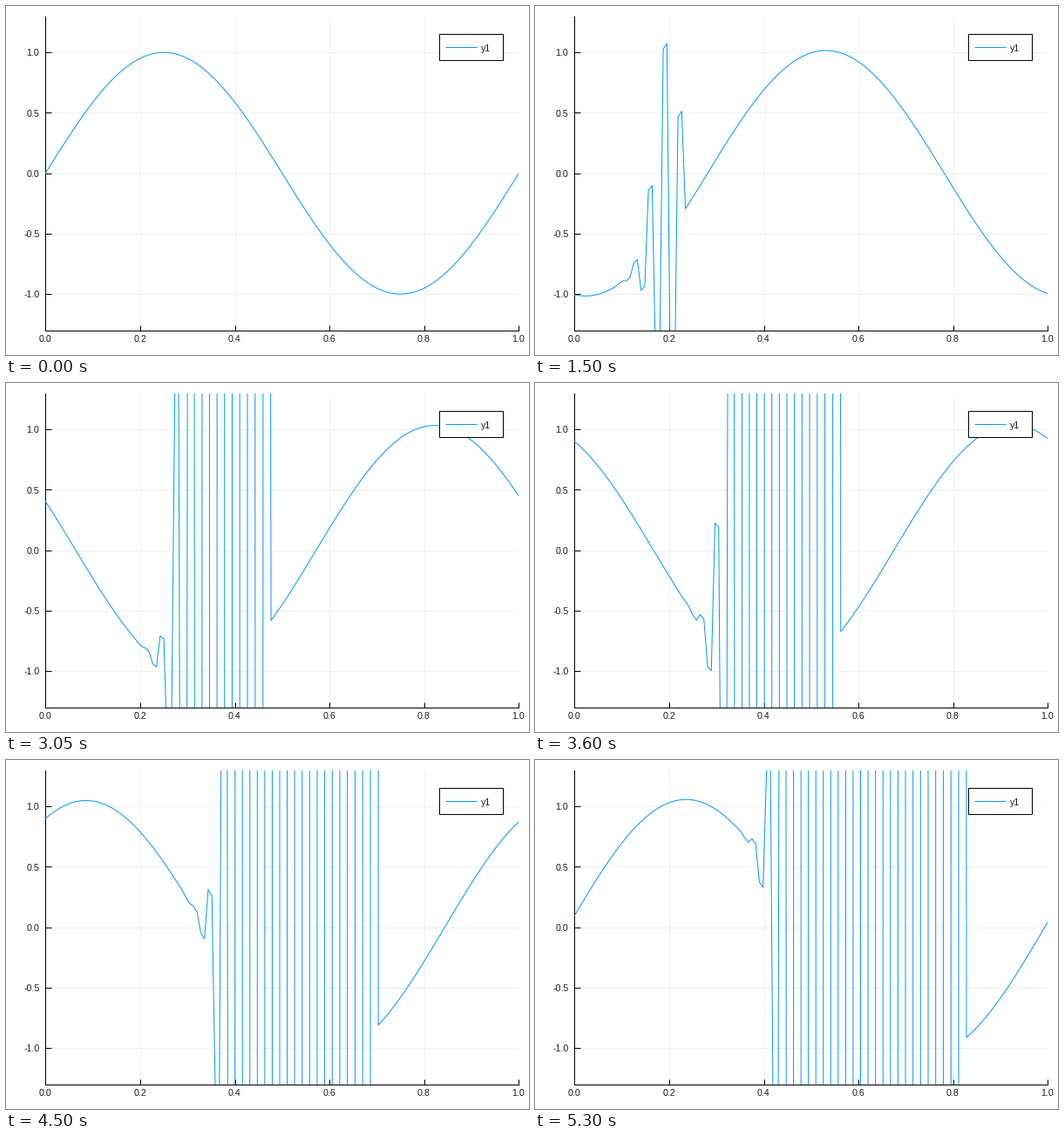
A matplotlib script that plays this animation: 600 by 400 pixels, repeating every 5350 ms.

```python
import numpy as np
import matplotlib.pyplot as plt
from matplotlib.animation import FuncAnimation
from matplotlib.patches import Rectangle

W, H, DPI = 600, 400, 100
PX = 72 / DPI  # points per pixel
LEFT, TOP, PLOT_W, PLOT_H = 45.3, 11.7, 543, 360
CELLS, FRAMES, COURANT = 128, 107, 1.2
BLUE, INK = "#009afa", "#1c1c1c"

plt.rcParams.update({
    "font.family": "Liberation Sans",
    "font.size": 10.6 * PX,
    "path.simplify": False,
})


def lax_friedrichs(u):
    """One advection step on a periodic ring, unstable for COURANT > 1."""
    west, east = np.roll(u, 1), np.roll(u, -1)
    return (west + east) / 2 - COURANT / 2 * (east - west)


x = np.linspace(0, 1, CELLS + 1)
states = [np.sin(2 * np.pi * x)]
while len(states) < FRAMES:
    states.append(lax_friedrichs(states[-1]))

fig = plt.figure(figsize=(W / DPI, H / DPI), dpi=DPI, facecolor="white")
ax = fig.add_axes([LEFT / W, 1 - (TOP + PLOT_H) / H, PLOT_W / W, PLOT_H / H])
ax.set(xlim=(0, 1), ylim=(-1.3, 1.3))
xticks, yticks = np.linspace(0, 1, 6), np.linspace(-1, 1, 5)
ax.set_xticks(xticks)
ax.set_yticks(yticks)
ax.tick_params(direction="in", length=6.5 * PX, width=PX,
               labelbottom=False, labelleft=False)
ax.grid(color="#f0f0f0", linewidth=PX)
ax.set_axisbelow(True)
ax.spines[["top", "right"]].set_visible(False)
for side in ("left", "bottom"):
    ax.spines[side].set_linewidth(PX)
curve, = ax.plot(x, states[0], color=BLUE, linewidth=PX, zorder=3)

# Overlay in pixel coordinates for labels and legend
over = fig.add_axes([0, 0, 1, 1], zorder=5)
over.set(xlim=(0, W), ylim=(H, 0))
over.axis("off")


def label(px, py, text, ha):
    over.text(px, py, text, ha=ha, va="baseline", color=INK)


for t in xticks:
    label(LEFT + t * PLOT_W - 0.3, 385, f"{t:.1f}", "center")
for t in yticks:
    label(38.3, TOP + (1.3 - t) / 2.6 * PLOT_H + 4.2, f"{t:.1f}".replace("\u2212", "-"), "right")

over.add_patch(Rectangle((497.2, 32.4), 73, 30, facecolor="white",
                         edgecolor="black", linewidth=PX))
over.plot([503.5, 539.5], [47.4, 47.4], color=BLUE, linewidth=PX,
          solid_capstyle="butt")
label(545, 51.5, "y1", "left")


def update(n):
    curve.set_ydata(states[n])
    return curve,


anim = FuncAnimation(fig, update, frames=FRAMES, interval=50,
                     repeat=True, repeat_delay=0, blit=False)
plt.show()
```
